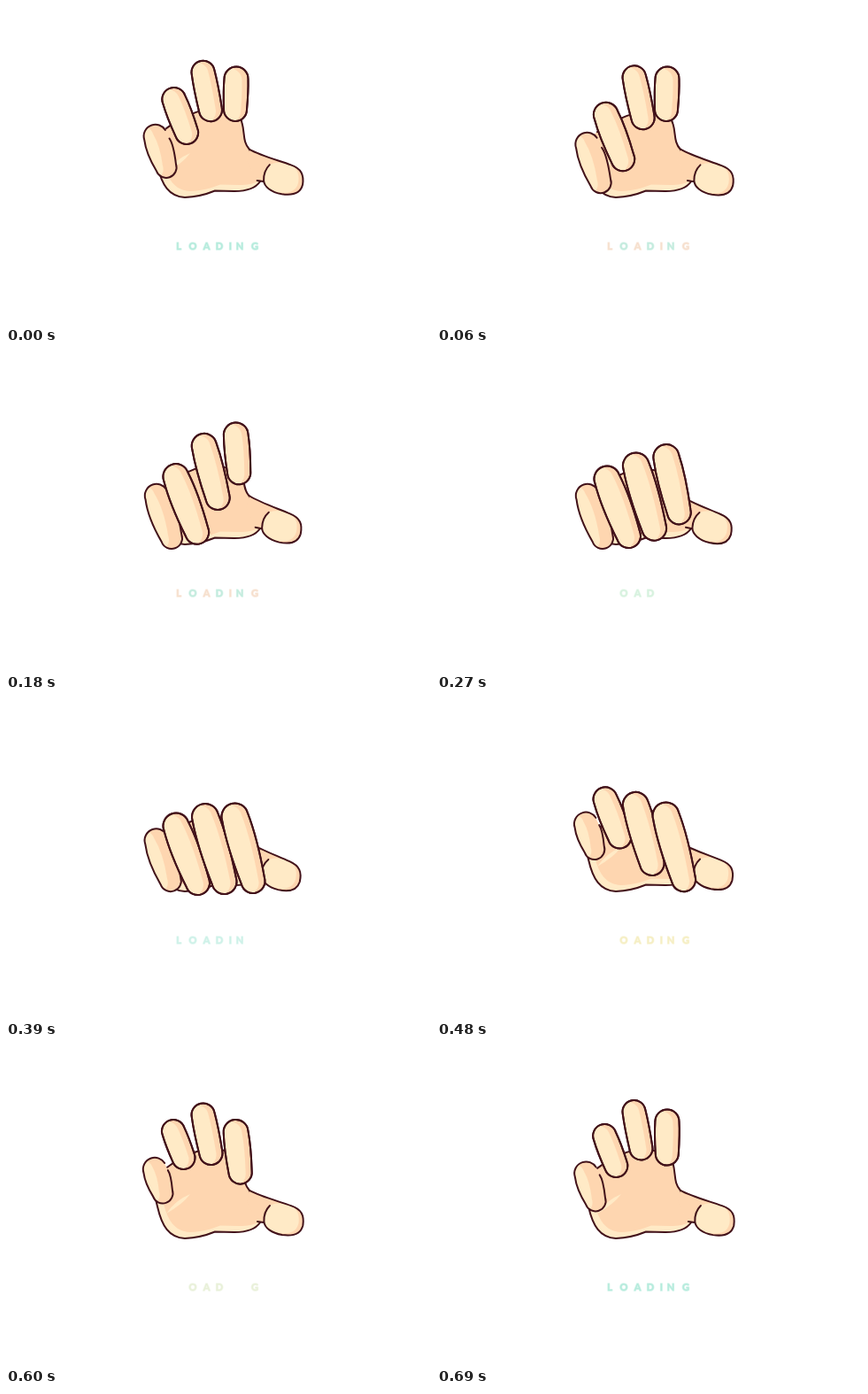
Animation, 480 px wide and 360 px high, one loop 0.72 s. Source, as an HTML page with a canvas:

```html
<!DOCTYPE html>
<html lang="en">
<head>
<meta charset="utf-8">
<title>Loading hand</title>
<style>
html, body { margin: 0; width: 100%; height: 100%; overflow: hidden; background: #fff; }
canvas { display: block; }
</style>
</head>
<body>
<canvas width="480" height="360"></canvas>
<script>
const ctx = document.querySelector('canvas').getContext('2d');
const LOOP = 720, STEP = 30;
const INK = '#42121a', CREAM = '#ffeac6', PEACH = '#fed6b0';

// Poses are [top x, top y, tip x, tip y, top radius, tip radius, side bulge].
const TIMES = [0, 120, 270, 390, 480, 600, 690];
const FINGERS = [
  { open: [168, 138, 177, 165, 13.2, 11.5, 3], shut: [170, 161, 187, 209, 13.2, 12, 5],
    curl: [.39, 1, 1, .89, .08, 0, .2], joined: true },
  { open: [189, 95, 200.5, 125, 13, 13, 1], shut: [192, 142, 216.5, 206.5, 14.5, 13.5, 3.5],
    curl: [.22, .87, 1, 1, .36, 0, .11] },
  { open: [222.5, 73, 230.5, 114.5, 13, 13, 1], shut: [225, 132, 246.5, 205, 15, 14, 3.5],
    curl: [.03, .27, .92, 1, .77, .06, 0] },
  { open: [260, 82, 259, 117, 13.5, 13, 1], shut: [258.5, 131.5, 279, 204.5, 15, 13.5, 3.5],
    curl: [0, 0, .72, 1, .98, .28, .04] }
];

// Text phases: start time, visible letters, colours taken in turn.
const LETTER_X = [195, 211, 226.5, 241, 253.5, 264, 281];
const PHASES = [
  [0, 'LOADING', ['#b4ebdc']],
  [60, 'LOADING', ['#f6dfcd', '#c2ebdd']],
  [210, ' OAD   ', ['#d6f1de']],
  [330, 'LOADIN ', ['#cdf1e8']],
  [450, ' OADING', ['#f5eec2']],
  [540, ' OAD  G', ['#e8f0d8']],
  [660, 'LOADING', ['#b4ebdc']]
];

// Periodic monotone cubic through the curl values.
function curlAt(values, t) {
  const n = TIMES.length;
  const at = i => values[(i + n) % n];
  const span = i => (TIMES[(i + 1 + n) % n] - TIMES[(i + n) % n] + LOOP) % LOOP;
  const rate = i => (at(i + 1) - at(i)) / span(i);
  const slope = i => {
    const a = rate(i - 1), b = rate(i);
    return a * b > 0 ? 2 * a * b / (a + b) : 0;
  };
  const i = TIMES.findLastIndex(start => start <= t);
  const w = span(i), u = (t - TIMES[i]) / w, v = 1 - u;
  return at(i) * v * v * (1 + 2 * u) + at(i + 1) * u * u * (1 + 2 * v)
    + w * u * v * (slope(i) * v - slope(i + 1) * u);
}

// Bulging capsule; an open one stops at the upper right, where it meets the palm.
function capsule([x1, y1, x2, y2, r1, r2, bulge], open) {
  const a = Math.atan2(y2 - y1, x2 - x1), q = Math.PI / 2;
  const point = (f, side, extra = 0) => {
    const r = r1 + (r2 - r1) * f + extra;
    return [x1 + (x2 - x1) * f + side * r * Math.sin(a),
      y1 + (y2 - y1) * f - side * r * Math.cos(a)];
  };
  const path = new Path2D();
  path.moveTo(...point(open ? .2 : 0, 1, open ? bulge * .3 : 0));
  path.quadraticCurveTo(...point(.4, 1, bulge), ...point(1, 1));
  path.arc(x2, y2, r2, a - q, a + q);
  path.quadraticCurveTo(...point(.4, -1, bulge), ...point(0, -1));
  path.arc(x1, y1, r1, a + q, a + (open ? 2.85 : 3) * q);
  return path;
}

// Fills the shape with shade, then lays a lighter shifted copy inside it.
function shaded(shape, dx, dy, shade = PEACH, light = CREAM) {
  ctx.save();
  ctx.clip(shape);
  ctx.fillStyle = shade;
  ctx.fill(shape);
  ctx.translate(dx, dy);
  ctx.fillStyle = light;
  ctx.fill(shape);
  ctx.restore();
}

function drawPalm(m) {
  const d = 17 * m;
  const palm = new Path2D(`M181 ${136 + d} L195 ${126 + d} L214 ${118 + d}
    Q230 ${112 + d} 250 ${117 + d} Q264 ${119 + d / 2} 266.5 ${131 + d / 3}
    C270 144 267 153 275 162 L280 175 L287 198
    C281 207 268 209 258 209 L236 208.5 C225 213 215 215.5 202 216
    C184 215 176 202 171 180 L165 155`);
  shaded(palm, 6, -7, CREAM, PEACH);
  ctx.stroke(palm);
  ctx.fillStyle = CREAM;
  ctx.fill(new Path2D('M181 188 Q191 173 208 166 Q200 177 181 188Z'));
}

function drawThumb(m) {
  ctx.save();
  ctx.translate(275, 162 - m);
  ctx.rotate(.09 * m);
  ctx.translate(-275, -162);
  const tip = 'C334 183 337 190 335.5 201 C333 212 323 213.5 312 212 C300 210 292 204 291.5 197';
  const edge = 'M275 162 C288 169 308 174 322 179 ' + tip;
  ctx.fillStyle = PEACH;
  ctx.fill(new Path2D(edge + ' L284 197 L272 175Z'));
  shaded(new Path2D('M298 179 Q308 174 322 179 ' + tip + ' Q291 185 298 179Z'), -5, -2);
  ctx.stroke(new Path2D(edge + ' Q291 186 298 179 M291 198 L284 197'));
  ctx.restore();
}

function drawFinger({ open, shut, joined }, k) {
  const pose = open.map((v, i) => v + (shut[i] - v) * k);
  shaded(capsule(pose), joined ? -15 : -7, 2);
  ctx.stroke(capsule(pose, joined));
  if (!joined) ctx.stroke(capsule(pose));
}

function drawText(t) {
  const [, letters, colors] = PHASES.findLast(phase => phase[0] <= t);
  ctx.font = 'bold 11px Lato, sans-serif';
  ctx.textAlign = 'center';
  ctx.lineWidth = 1.5;
  LETTER_X.forEach((x, i) => {
    ctx.fillStyle = ctx.strokeStyle = colors[i % colors.length];
    ctx.globalAlpha = .6;
    ctx.strokeText(letters[i], x, 275);
    ctx.globalAlpha = 1;
    ctx.fillText(letters[i], x, 275);
  });
}

function draw(now) {
  const t = Math.floor(now % LOOP / STEP) * STEP;
  const curls = FINGERS.map(f => curlAt(f.curl, t));
  const m = (curls[1] + curls[2]) / 2;
  ctx.fillStyle = '#fff';
  ctx.fillRect(0, 0, 480, 360);
  ctx.strokeStyle = INK;
  ctx.lineWidth = 2;
  ctx.lineCap = ctx.lineJoin = 'round';
  drawPalm(m);
  drawThumb(m);
  FINGERS.forEach((f, i) => drawFinger(f, curls[i]));
  drawText(t);
  requestAnimationFrame(() => draw(performance.now()));
}

draw(performance.now());
</script>
</body>
</html>
```
